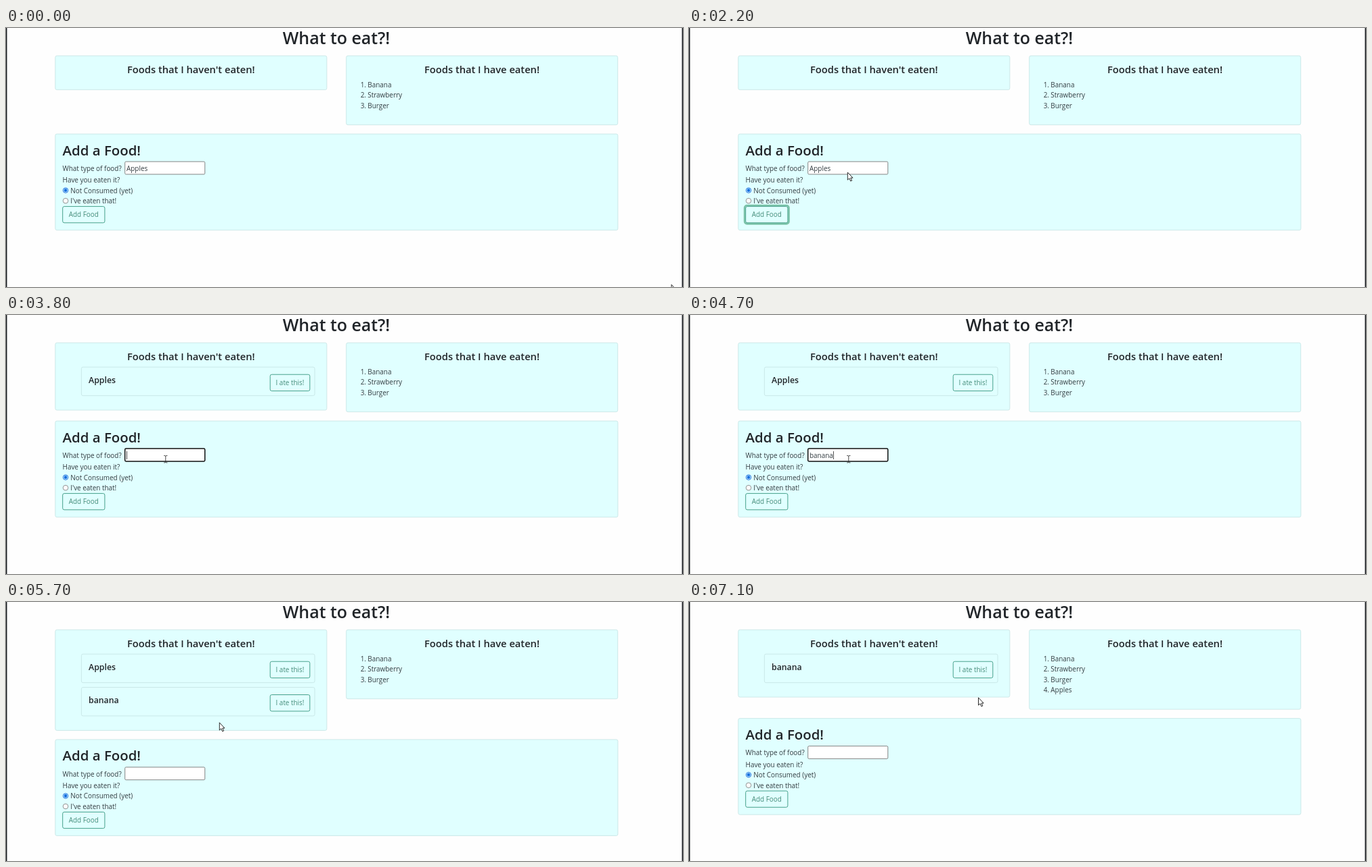
An HTML page that plays this animation: 1000 by 384 pixels, repeating every 7.2 s.

```html
<!DOCTYPE html>
<html lang="en">
<head>
<meta charset="utf-8">
<title>What to eat?!</title>
<style>
  html, body { margin: 0; width: 100%; height: 100%; overflow: hidden; background: #fff; }
  svg { display: block; width: 100%; height: 100%; font: 9.92px "Open Sans", "Noto Sans", sans-serif; }
  text { fill: #343d42; white-space: pre; }
  .h1, .h2, .h4, .h5 { font-weight: 600; fill: #212529; }
  .h1 { font-size: 24.95px; }
  .h2 { font-size: 20.4px; }
  .h4 { font-size: 14.7px; }
  .h5 { font-size: 12.3px; }
  .mid { text-anchor: middle; }
  .card { fill: #e0ffff; stroke: #c4e2e3; stroke-width: .8; }
  .row { fill: none; stroke: #c4e2e3; stroke-width: .8; }
  .btn rect { fill: transparent; stroke: #46a08b; stroke-width: 1; }
  .btn text { fill: #458c7a; text-anchor: middle; }
  .btn .ring { display: none; fill: none; stroke: #19875480; stroke-width: 2.6; }
  .btn.focus .ring { display: inline; }
  .btn.hover .face { fill: #198754; stroke: #198754; }
  .btn.hover text { fill: #fff; }
  .field { fill: #fff; stroke: #767676; stroke-width: .9; }
  .field.focus { stroke: #101010; stroke-width: 1.5; }
  .pointer { fill: #fff; stroke: #111; stroke-width: .9; stroke-linejoin: round; }
</style>
</head>
<body>
<svg id="stage" viewBox="0 0 1000 384"></svg>
<script>
const LOOP = 7200, STEP = 100;

const text = (x, y, str, cls = '', id = '') =>
  `<text x="${x}" y="${y}" class="${cls}" id="${id}">${str}</text>`;

const box = (cls, x, y, w, h, id = '', r = 2.4) =>
  `<rect class="${cls}" id="${id}" x="${x}" y="${y}" width="${w}" height="${h}" rx="${r}"/>`;

const button = (id, x, y, w, h, label) => `<g class="btn" id="${id}">
  ${box('ring', x - 1.6, y - 1.6, w + 3.2, h + 3.2, '', 3.6)}
  ${box('face', x, y, w, h)}${text(x + w / 2, y + h / 2 + 3.7, label, 'mid')}</g>`;

const radio = (y, on) => on
  ? `<circle cx="88" cy="${y}" r="3.7" fill="#fff" stroke="#0b6fe0"/><circle cx="88" cy="${y}" r="2.4" fill="#0b6fe0"/>`
  : `<circle cx="88" cy="${y}" r="3.8" fill="#fff" stroke="#767676" stroke-width=".8"/>`;

const row = i => `<g id="row${i}" transform="translate(0 ${i * 49.3})">
  ${box('row', 111.4, 77.2, 344.6, 42.4)}${text(122, 101.2, '', 'h5', 'name' + i)}
  ${button('ate' + i, 390.2, 88.2, 58.6, 24.4, 'I ate this!')}</g>`;

const eaten = ['Banana', 'Strawberry', 'Burger', 'Apples'].map((food, i) => {
  const y = 87.7 + i * 15.45;
  return `<g id="item${i}">${text(523.7, y, i + 1 + '.')}${text(534.3, y, food)}</g>`;
}).join('');

const form = `<g id="form">
  ${box('card', 72.8, 157.1, 831, 142.6)}
  ${text(83.6, 188.6, 'Add a Food!', 'h2')}
  ${text(83.6, 211.8, 'What type of food?')}
  ${box('field', 175.7, 198.1, 118.1, 18.8, 'field', 1.6)}
  ${text(178, 211.8, '', '', 'typed')}
  <rect id="caret" y="202" width=".8" height="12" fill="#222"/>
  ${text(83.6, 229.2, 'Have you eaten it?')}
  ${radio(240.7, true)}${text(95.2, 244.7, 'Not Consumed (yet)')}
  ${radio(256.2, false)}${text(95.2, 260.2, "I've eaten that!")}
  ${button('add', 83.7, 264.6, 62.2, 24.2, 'Add Food')}</g>`;

// Each pointer is drawn with its hot spot at 0,0.
const pointers = `
  <path class="pointer" id="arrow" d="M0 0V11.2L2.6 8.9L4.4 13L6.3 12.2L4.5 8.2H7.7Z"/>
  <path class="pointer" id="hand" d="M-1.2 1Q0-.6 1.2 1V6Q2.6 5 3.6 6.4Q5 5.6 5.8 7Q7.6 6.4 8 8.2V11.6Q7.6 13.6 6.8 14.4V16H-.2V14.6L-4 9.8Q-4.6 8.2-3.2 7.8Q-2.2 8-1.2 9.4Z"/>
  <path id="beam" fill="none" stroke="#333" stroke-width=".9" d="M-2.6-5Q-.4-5 0-4.2Q.4-5 2.6-5M0-4.4V5M-2.6 5.6Q-.4 5.6 0 4.8Q.4 5.6 2.6 5.6"/>`;

document.getElementById('stage').innerHTML = `
  <rect width="1000" height="384" fill="#fefefe"/>
  ${text(488, 23.6, 'What to eat?!', 'h1 mid')}
  ${box('card', 72.8, 41.2, 401, 50.4, 'todo')}${text(273.3, 67.4, "Foods that I haven't eaten!", 'h4 mid')}
  ${box('card', 502.6, 41.2, 401, 102.4, 'done')}${text(703, 67.4, 'Foods that I have eaten!', 'h4 mid')}
  ${row(0)}${row(1)}${eaten}${form}
  <path d="M.7 0V384M999.2 0V384" stroke="#14181c" stroke-width="1.5"/>
  <g id="mouse">${pointers}</g>`;

const el = id => document.getElementById(id);
const show = (id, on) => el(id).style.display = on ? 'inline' : 'none';
const mark = (id, cls, on) => el(id).classList.toggle(cls, on);
const within = (t, ...spans) => spans.some(([a, b]) => t >= a && t < b);
const latest = (table, t) => table.findLast(entry => entry[0] <= t);

// time, x, y
const path = [
  [0, 983, 380.5], [900, 138.5, 279.6], [1700, 138.5, 279.6], [2200, 234.3, 214],
  [2500, 235.8, 213.4], [4700, 235.8, 213.4], [5100, 128, 278], [5300, 128, 278],
  [5700, 315.3, 178.8], [6200, 418, 100], [6700, 418, 100], [7000, 419, 134.6], [7100, 427.5, 141.8]
];
const shapes = [
  [0, 'arrow'], [800, 'hand'], [1900, 'arrow'], [2300, 'beam'], [4900, 'arrow'],
  [5000, 'hand'], [5500, 'arrow'], [6100, 'hand'], [6900, 'arrow']
];
const typing = [
  [0, 'Apples'], [2400, ''], [4100, 'b'], [4200, 'ba'], [4300, 'bana'], [4400, 'banana'], [5500, '']
];
const lists = [
  [0, []], [2400, ['Apples']], [5500, ['Apples', 'banana']], [6700, ['banana']]
];

function position(t) {
  const i = path.findLastIndex(p => p[0] <= t);
  const a = path[i], b = path[i + 1] || a;
  const k = b === a ? 0 : (t - a[0]) / (b[0] - a[0]);
  const s = k * k * (3 - 2 * k);
  return [a[1] + (b[1] - a[1]) * s, a[2] + (b[2] - a[2]) * s];
}

function render(t) {
  const foods = latest(lists, t)[1];
  const count = t >= 6700 ? 4 : 3;
  for (const i of [0, 1]) {
    show('row' + i, i < foods.length);
    el('name' + i).textContent = foods[i] || '';
  }
  show('item3', count === 4);
  const left = 50.4 + foods.length * 49.4, right = 102.4 + (count - 3) * 15.5;
  el('todo').setAttribute('height', left);
  el('done').setAttribute('height', right);
  el('form').setAttribute('transform', `translate(0 ${Math.max(left, right) - 102.4})`);

  const [since, value] = latest(typing, t);
  const focused = within(t, [2600, 5200]);
  el('typed').textContent = value;
  mark('field', 'focus', focused);
  show('caret', focused && (t - Math.max(since, 2600)) % 1000 < 500);
  el('caret').setAttribute('x', 178.2 + (value ? el('typed').getComputedTextLength() : 0));

  mark('add', 'hover', within(t, [800, 1900], [5000, 5400]));
  mark('add', 'focus', within(t, [1400, 2600], [5200, 5500]));
  mark('ate0', 'hover', within(t, [6100, 6900]));
  mark('ate0', 'focus', within(t, [6400, 6700]));

  const shape = latest(shapes, t)[1];
  for (const id of ['arrow', 'hand', 'beam']) show(id, id === shape);
  el('mouse').setAttribute('transform', `translate(${position(t)})`);
}

const start = performance.now();
function tick(now) {
  const t = Math.max(0, now - start) % LOOP;
  render(Math.floor(t / STEP) * STEP);
  requestAnimationFrame(tick);
}
render(0);
requestAnimationFrame(tick);
</script>
</body>
</html>
```
